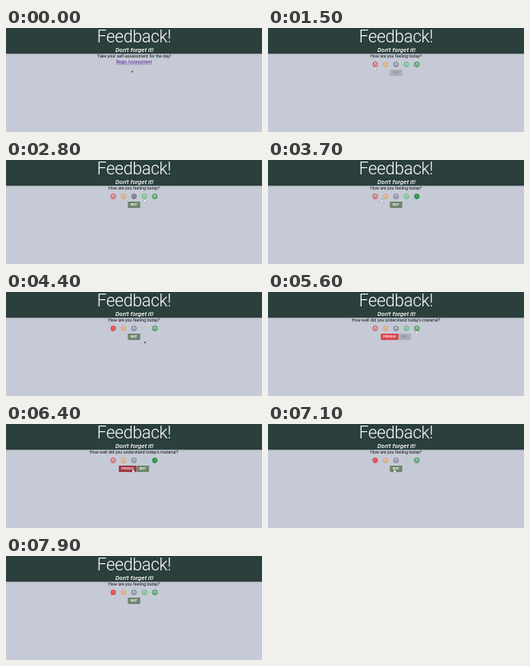
Animation of 320x130 px, one loop 8000 ms. Source, as an HTML page with a canvas:

```html
<!DOCTYPE html>
<html lang="en">
<head>
<meta charset="utf-8">
<title>Feedback</title>
<style>
  html, body { margin: 0; width: 100%; height: 100%; overflow: hidden; background: #c5cad6; }
  canvas { display: block; width: 320px; height: 130px; }
</style>
</head>
<body>
<canvas id="stage"></canvas>
<script>
const W = 320, H = 130, LOOP = 8000, STEP = 100;
const canvas = document.getElementById('stage');
const ctx = canvas.getContext('2d');
const dpr = window.devicePixelRatio || 1;
canvas.width = W * dpr;
canvas.height = H * dpr;

const FACE_Y = 45.5;
const COLORS = ['#ee2f34', '#f59a3c', '#68717f', '#46bd60', '#0c8724'];
const faceX = i => 134 + 13 * i;

const QUESTIONS = {
  feeling: 'How are you feeling today?',
  material: "How well did you understand today's material?"
};

// What the pointer visits: a face by its index, or a named place.
const PLACES = {
  rest: { x: 158, y: 54 },
  link: { x: 161, y: 43, opens: 'feeling' },
  below: { x: 174, y: 62.5 },
  next: { x: 160, y: 57, opens: 'material' },
  previous: { x: 158.5, y: 57.5, opens: 'feeling' }
};
const placeOf = key => PLACES[key] || { x: faceX(key), y: 49, pick: key };

const VISITS = [
  [0, 'rest'], [600, 'link'], [1700, 0], [2050, 1], [2400, 2], [2900, 3],
  [3400, 4], [3900, 0], [4400, 'below'], [5000, 'next'], [5750, 4],
  [7050, 'previous'], [LOOP, 0]
].map(([at, key]) => ({ at, ...placeOf(key) }));

// The pointer leaves after each visit and arrives ahead of the next one.
function cursorAt(t) {
  const i = VISITS.findIndex(v => v.at > t);
  const from = VISITS[i - 1], to = VISITS[i];
  const travel = Math.min(700, (to.at - from.at) * 0.8);
  const k = Math.min(1, (t - from.at) / travel);
  const eased = k * k * (3 - 2 * k);
  return {
    x: from.x + (to.x - from.x) * eased,
    y: from.y + (to.y - from.y) * eased
  };
}

// Replays the visits so far; each page keeps its own answer.
function stateAt(t) {
  let page = 'start';
  const answers = {};
  for (const visit of VISITS.filter(v => v.at <= t)) {
    if (visit.pick !== undefined) answers[page] = visit.pick;
    page = visit.opens || page;
  }
  return { page, picked: answers[page] };
}

function text(str, x, y, font, color, spacing = 0) {
  ctx.font = font + ' Roboto, sans-serif';
  ctx.letterSpacing = spacing + 'px';
  ctx.fillStyle = color;
  ctx.textAlign = 'center';
  ctx.fillText(str, x, y);
}

const line = (str, y, color) => text(str, 160, y, '400 5.38px', color);

function header() {
  ctx.save();
  ctx.shadowColor = 'rgba(0,0,0,.4)';
  ctx.shadowBlur = 1.6 * dpr;
  ctx.shadowOffsetY = 0.5 * dpr;
  ctx.fillStyle = '#2b3f3d';
  ctx.fillRect(-4, -4, W + 8, 36);
  ctx.restore();
  text('Feedback!', 160, 17.6, '300 21.4px', '#fff', -0.33);
  text("Don't forget it!", 160.5, 29.8, 'italic 500 7.8px', '#fff');
}

function dot(x, y, r) {
  ctx.beginPath();
  ctx.arc(x, y, r, 0, 2 * Math.PI);
}

function face(i, picked, faded) {
  const mood = (i - 2) / 2;
  ctx.save();
  ctx.translate(faceX(i), FACE_Y);
  ctx.strokeStyle = ctx.fillStyle = COLORS[i];
  ctx.globalAlpha = faded ? 0.12 : 1;
  ctx.lineWidth = 0.9;
  dot(0, 0, 3);
  ctx.stroke();
  if (picked) {
    ctx.globalAlpha *= 0.6;
    ctx.fill();
    ctx.globalAlpha = 1;
  }
  for (const side of [-1, 1]) {
    dot(1.1 * side, -0.8, 0.55);
    ctx.fill();
  }
  ctx.beginPath();
  ctx.moveTo(-1.6, 1.1 - mood * 0.5);
  ctx.quadraticCurveTo(0, 1.1 + mood * 1.3, 1.6, 1.1 - mood * 0.5);
  ctx.stroke();
  ctx.restore();
}

function button(label, x, w, fill, color = '#fff') {
  ctx.fillStyle = fill;
  ctx.beginPath();
  ctx.roundRect(x, 52, w, 8, 0.8);
  ctx.fill();
  text(label, x + w / 2, 57.1, '700 3.1px', color, 0.08);
}

function nextButton(x, enabled) {
  if (enabled) button('NEXT', x, 15.5, '#6f866e');
  else button('NEXT', x, 15.5, '#a9aeb7', '#888c95');
}

function cursor({ x, y }, hand) {
  ctx.save();
  ctx.translate(x, y);
  ctx.lineWidth = 0.4;
  ctx.strokeStyle = hand ? '#333' : '#ddd';
  ctx.fillStyle = hand ? '#fff' : '#000';
  ctx.beginPath();
  if (hand) {
    ctx.roundRect(-0.5, -0.8, 0.9, 2.4, 0.4);
    ctx.roundRect(-1, 0.7, 2.6, 2, 0.6);
  } else {
    ctx.moveTo(-0.8, -0.8);
    ctx.lineTo(-0.8, 1.6);
    ctx.lineTo(1, 1);
    ctx.closePath();
  }
  ctx.stroke();
  ctx.fill();
  ctx.restore();
}

function startPage() {
  line('Take your self-assessment for the day!', 37.2, '#111');
  line('Begin Assessment', 44.2, '#5a2299');
  ctx.fillRect(138, 44.8, 44, 0.45);
}

function questionPage(page, picked, pointer, onButton) {
  const answered = picked !== undefined;
  line(QUESTIONS[page], 37.2, '#111');
  COLORS.forEach((_, i) => {
    // The light green face fades once the pointer has moved below the row.
    face(i, i === picked, i === 3 && answered && pointer.y > 51);
  });
  if (page === 'material') {
    button('PREVIOUS', 141, 22, onButton ? '#a03a43' : '#dc4750');
    nextButton(163.3, answered);
  } else {
    nextButton(152.3, answered);
  }
}

function draw(time) {
  const t = Math.floor((time % LOOP) / STEP) * STEP;
  const { page, picked } = stateAt(t);
  const pointer = cursorAt(t);
  const onButton = page !== 'start' && Math.abs(pointer.y - 56) < 4
    && Math.abs(pointer.x - 160) < 8;
  ctx.setTransform(dpr, 0, 0, dpr, 0, 0);
  ctx.fillStyle = '#c5cad6';
  ctx.fillRect(0, 0, W, H);
  header();
  if (page === 'start') startPage();
  else questionPage(page, picked, pointer, onButton);
  cursor(pointer, onButton || pointer.y < 50);
}

const begin = performance.now();
function tick() {
  draw(performance.now() - begin);
  requestAnimationFrame(tick);
}
tick();
</script>
</body>
</html>
```
